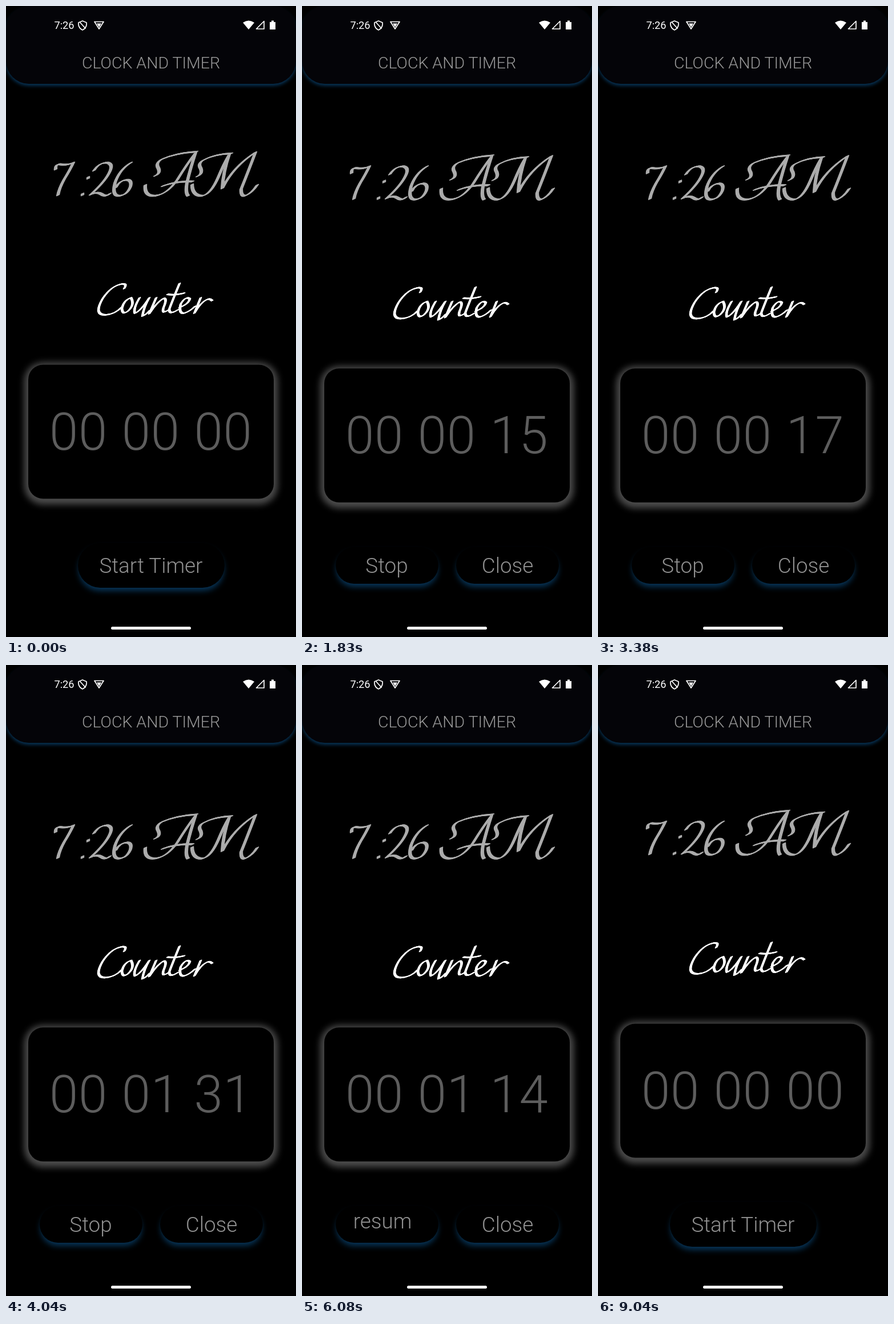
Write an HTML page that moves like this. It is 508 px wide and 1102 px high and loops after 9.08 s.

```html
<!DOCTYPE html>
<html lang="en">
<head>
<meta charset="utf-8">
<style>
  html, body { margin: 0; width: 100%; height: 100%; overflow: hidden; background: #000; }
  div, svg { position: absolute; }
  svg { left: 0; top: 0; }
  #header { left: 0; top: 0; width: 508px; height: 136px; border-radius: 40px; background: #040408; box-shadow: 0 4px 6px -1px #08395f; }
  #panel { left: 39px; top: 633px; width: 430px; height: 234px; border-radius: 26px; background: #000; box-shadow: 0 3px 12px 7px #4c4c4c; }
  .button { top: 945px; width: 180px; height: 64px; border-radius: 39px; background: #000; box-shadow: 0 7px 11px -2px #08395f; }
  #start { left: 126px; top: 938px; width: 257px; height: 78px; }
  #stop { left: 59px; }
  #close { left: 270px; }
  text { font-family: Roboto, sans-serif; font-weight: 300; text-anchor: middle; }
  .label { font-size: 36.8px; fill: #919191; }
  .digits { font-size: 90.55px; letter-spacing: .65px; fill: #5d5d5d; }
  .pen { fill: none; stroke-linecap: round; stroke-linejoin: round; }
</style>
</head>
<body>
<div id="header"></div>
<div id="panel"></div>
<div class="button" id="start"></div>
<div class="button" id="stop"></div>
<div class="button" id="close"></div>
<svg width="508" height="1102" viewBox="0 0 508 1102">
  <g fill="#fff">
    <text x="102" y="40" font-size="18.2" style="font-weight:400">7:26</text>
    <path d="M415 29Q425 22 435 29L425 41ZM462 28H465V25.500H469V28H472V41H462ZM159 30.500H167L163 37Z"/>
    <rect x="184" y="1084" width="140" height="5" rx="2.500"/>
  </g>
  <path class="pen" stroke="#fff" stroke-width="1.700" d="M134 26L141 29V33Q140 39 134 42Q128 39 127 33V29ZM130 29L139 39M155 27.500H171L163 40ZM438.500 40H452V26.500Z"/>
  <text x="254" y="109" font-size="28.500" fill="#999">CLOCK AND TIMER</text>
  <g id="middle">
    <g id="script"></g>
    <text class="digits" x="127" y="781">00</text>
    <text class="digits" id="seconds" x="253.700" y="781">00</text>
    <text class="digits" id="fraction" x="380.500" y="781">00</text>
  </g>
  <text class="label" id="startLabel" x="254" y="990">Start Timer</text>
  <text class="label" id="stopLabel" x="148.500" y="990">Stop</text>
  <text class="label" id="closeLabel" x="360" y="990">Close</text>
</svg>
<script>
const LOOP = 9080, FRAME = 1000 / 24;
const STARTED = 570, PAUSED = 5560, CLOSED = 7630;
const $ = id => document.getElementById(id);

// Elapsed milliseconds of the slowed-down stopwatch: [time, value]
const pace = [[STARTED, 0], [1000, 140.5], [2708.3, 703.5], [4041.7, 1131.5], [5291.7, 1519.5], [PAUSED, 1614.5]];

// Pen strokes of the handwritten lines
const clock = [
  'M87 292Q86 282 95 283Q108 285 118 280Q112 293 102 309Q93 325 91 337',
  'M144 308V305M134 337V334',
  'M154 294Q163 280 177 280Q187 282 183 293Q176 311 148 336Q159 330 167 335Q175 341 182 334',
  'M219 280Q199 292 191 315Q185 338 198 338Q212 337 218 322Q221 310 211 310Q199 311 192 324',
  'M334 261Q298 263 273 274Q261 281 267 290Q271 299 261 303',
  'M244 319Q242 338 259 338Q281 337 300 310Q318 281 332 263Q323 290 317 315Q314 333 319 338',
  'M274 321Q298 312 327 313',
  'M395 264Q366 265 347 275Q335 281 341 290Q345 300 335 304',
  'M326 318Q326 338 344 338Q359 335 372 305Q382 281 391 266Q380 298 379 325Q398 287 437 262Q423 299 412 326Q411 339 419 338Q431 333 440 319'
];
const counter = [
  'M207 500Q213 491 203 492Q184 495 169 518Q153 546 174 546Q191 545 203 532',
  'M219 516Q206 520 203 535Q204 547 214 539Q226 528 219 516',
  'M234 516Q222 536 226 543Q236 539 251 516Q241 533 239 548Q245 546 252 538',
  'M263 516L251 544Q264 524 276 517Q283 517 276 533Q272 546 285 537',
  'M304 491Q292 520 286 536Q286 547 301 537M283 510Q296 512 312 508',
  'M304 533Q320 527 322 518Q315 512 306 527Q302 544 312 543Q322 540 331 531',
  'M341 516L330 543Q341 524 352 519Q357 517 361 521'
];

// A broad nib: the same line repeated along a short rising edge
function nib(strokes, color, breadth) {
  let out = '';
  for (let i = -4; i <= 4; i++) {
    const d = i * breadth / 8;
    out += `<path class="pen" stroke="${color}" stroke-width="1.400" transform="translate(${d} ${-d * .45})" d="${strokes.join('')}"/>`;
  }
  return out;
}
$('script').innerHTML = nib(clock, '#acacac', 5) + nib(counter, '#fff', 3.4);

function elapsed(t) {
  if (t < STARTED || t >= CLOSED) return 0;
  if (t >= PAUSED) return pace[pace.length - 1][1];
  const i = pace.findIndex(p => p[0] > t);
  const [t0, a] = pace[i - 1], [t1, b] = pace[i];
  return a + (b - a) * (t - t0) / (t1 - t0);
}

const two = n => String(Math.floor(n)).padStart(2, '0');
const show = (id, on) => $(id).style.visibility = on ? 'visible' : 'hidden';

function ripple(id, t, from, to, x, y, color) {
  const r = (t - from) * .38;
  $(id).style.background = t > from && t < to
    ? `radial-gradient(circle at ${x}px ${y}px, ${color} ${r * .7}px, #000 ${r}px)` : '#000';
}

function draw(now) {
  const t = Math.floor(now % LOOP / FRAME + .1) * FRAME;
  const running = t >= STARTED && t < CLOSED, paused = t >= PAUSED;
  const ms = elapsed(t), lift = running ? 0 : -6.5;
  $('seconds').textContent = two(ms / 1000);
  $('fraction').textContent = two(ms % 100);
  $('middle').setAttribute('transform', `translate(0 ${lift})`);
  $('panel').style.transform = `translateY(${lift}px)`;
  for (const id of ['start', 'startLabel']) show(id, !running);
  for (const id of ['stop', 'stopLabel', 'close', 'closeLabel']) show(id, running);
  const label = $('stopLabel');
  label.textContent = paused ? 'resum' : 'Stop';
  label.setAttribute('x', paused ? 141 : 148.5);
  label.setAttribute('y', paused ? 983.5 : 990);
  ripple('stop', t, 5170, 5790, 136, 36, '#07070c');
  ripple('close', t, 6680, CLOSED, 90, 32, '#090911');
  requestAnimationFrame(draw);
}
requestAnimationFrame(draw);
</script>
</body>
</html>
```
